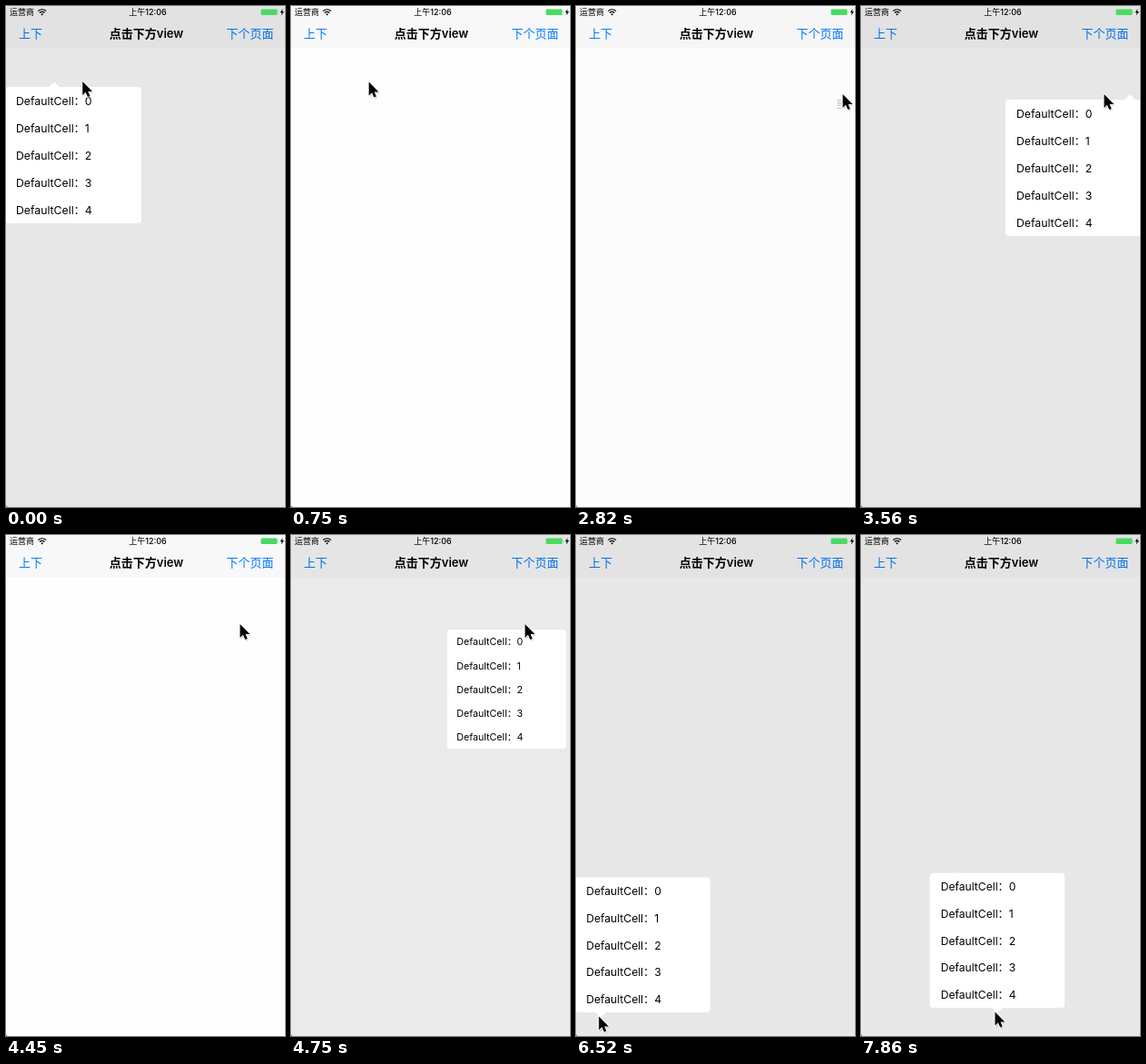
Animation, 307 px wide and 551 px high, one loop 8 s. Source, as an HTML page:

```html
<!DOCTYPE html>
<html lang="zh-CN">
<head>
<meta charset="utf-8">
<title>Popup menu</title>
<style>
  html, body { margin: 0; width: 100%; height: 100%; overflow: hidden; background: #fdfdfd; }
  svg { display: block; width: 100vw; height: 100vh; }
  text { font-family: Inter, "Noto Sans CJK SC", "Noto Sans CJK", sans-serif; font-size: 13px; }
  .status { font-size: 9px; }
  .link { fill: #007aff; }
  .cell { font-size: 12.25px; }
</style>
</head>
<body>
<svg viewBox="0 0 307 551" preserveAspectRatio="none">
  <rect width="307" height="551" fill="#fefefe"/>
  <rect width="307" height="47" fill="#f8f8f8"/>

  <text class="status" x="4" y="10">运营商</text>
  <g fill="none" stroke="#000" stroke-width="1.2">
    <path d="M35.3 5.6a6.2 6.2 0 0 1 8.8 0M37 7.5a3.8 3.8 0 0 1 5.4 0"/>
    <path d="M39.7 10.4l-1.3-1.5a1.9 1.9 0 0 1 2.6 0z" fill="#000" stroke="none"/>
  </g>
  <text class="status" x="156" y="10" text-anchor="middle" font-weight="500">上午12:06</text>
  <path d="M304.6 3l-3 4.2h1.9l-.7 3.3 3.2-4.5h-2z"/>

  <text class="link" x="14" y="35">上下</text>
  <text x="154.5" y="35" text-anchor="middle" font-weight="600">点击下方view</text>
  <text class="link" x="242.5" y="35">下个页面</text>

  <rect id="dim" width="307" height="551"/>
  <g fill="#4cd964">
    <rect x="280.5" y="3.5" width="18" height="6.5" rx="1.2"/>
    <path d="M299.3 5.4q1.4 1.3 0 2.8z"/>
  </g>
  <path d="M0 549.2V551H1.8z" fill="#777"/>

  <g id="menu">
    <rect width="150" height="150" rx="4" fill="#fff"/>
    <path id="arrow" fill="#fff"/>
    <g id="cells"></g>
  </g>

  <g id="cursor">
    <path d="M1 2V17l3.5-3.3 2.3 5 2.5-1.1-2.2-4.9H12z" opacity=".18"/>
    <path d="M0 0V15l3.4-3.2 2.3 5.2 2.5-1.1-2.2-5H10.8z" stroke="#fff" stroke-width="1.6" paint-order="stroke"/>
  </g>
</svg>
<script>
const LOOP = 8000, TICK = 148.2, FADE = 250, SIZE = 150, ROW = 30;
const MIN_LEFT = -1, MAX_LEFT = 159;
const el = id => document.getElementById(id);

const clamp = (v, lo, hi) => Math.min(hi, Math.max(lo, v));
const mix = (a, b, u) => a + (b - a) * u;
const smooth = u => {
  u = clamp(u, 0, 1);
  return u * u * (3 - 2 * u);
};

// tip: arrow x; edge: menu side with the arrow; drift: cursor shift while open
const menus = [
  { open: -480, tip: 53, edge: 89, drift: 35 },
  { open: 1146, tip: 89, edge: 92, drift: 33 },
  { open: 2776, tip: 296, edge: 103, drift: -26 },
  { open: 4548, tip: 260, edge: 104, drift: -22 },
  { open: 6286, tip: 27, edge: 525, drift: 60 },
  { open: 7620, tip: 150, edge: 520, drift: 0 }
];

for (const m of menus) {
  m.left = clamp(m.tip - SIZE / 2, MIN_LEFT, MAX_LEFT);
  m.below = m.edge > 275;
  m.tap = [m.tip - 2.5, m.edge + (m.below ? 4.5 : -6)];
  m.rest = [m.tap[0] + m.drift, m.tap[1]];
  m.close = Infinity;
}

// Cursor moves: longer trips take longer, up to a limit.
const moves = [];
const span = (a, b) => Math.min(450, 200 + 3 * Math.hypot(b[0] - a[0], b[1] - a[1]));
menus.forEach((m, i) => {
  moves.push({ from: m.tap, to: m.rest, at: m.open + 210 });
  const next = menus[i + 1];
  if (!next) return;
  const leave = next.open - 250 - span(m.rest, next.tap);
  moves.push({ from: m.rest, to: next.tap, at: leave });
  m.close = leave - 180;
});

el("cells").innerHTML = [0, 1, 2, 3, 4].map(i =>
  `<text class="cell" x="12" y="${i * ROW + 20}">DefaultCell：${i}</text>`).join("");

function cursorAt(t) {
  const { from, to, at } = moves.findLast(m => t >= m.at);
  const u = smooth((t - at) / span(from, to));
  return [mix(from[0], to[0], u), mix(from[1], to[1], u)];
}

function drawMenu(t) {
  const m = menus.find(m => t >= m.open && t < m.close + FADE);
  const shown = m ? smooth((t - m.open) / FADE) - smooth((t - m.close) / FADE) : 0;
  el("dim").setAttribute("opacity", 0.089 * shown);
  el("menu").style.display = shown > 0.005 ? "" : "none";
  if (!m) return;
  const x = m.tip - m.left, y = m.below ? SIZE : 0, rise = m.below ? 5.5 : -5.5;
  el("arrow").setAttribute("d", `M${x - 6} ${y}L${x} ${y + rise}L${x + 6} ${y}z`);
  el("menu").setAttribute("transform",
    `translate(${m.tip} ${m.edge}) scale(${shown}) translate(${-x} ${-y})`);
}

function draw(now) {
  const t = Math.floor((now % LOOP) / TICK) * TICK;
  drawMenu(t);
  el("cursor").setAttribute("transform", `translate(${cursorAt(t)})`);
}

const start = performance.now();
function loop() {
  draw(performance.now() - start);
  requestAnimationFrame(loop);
}
loop();
</script>
</body>
</html>
```
